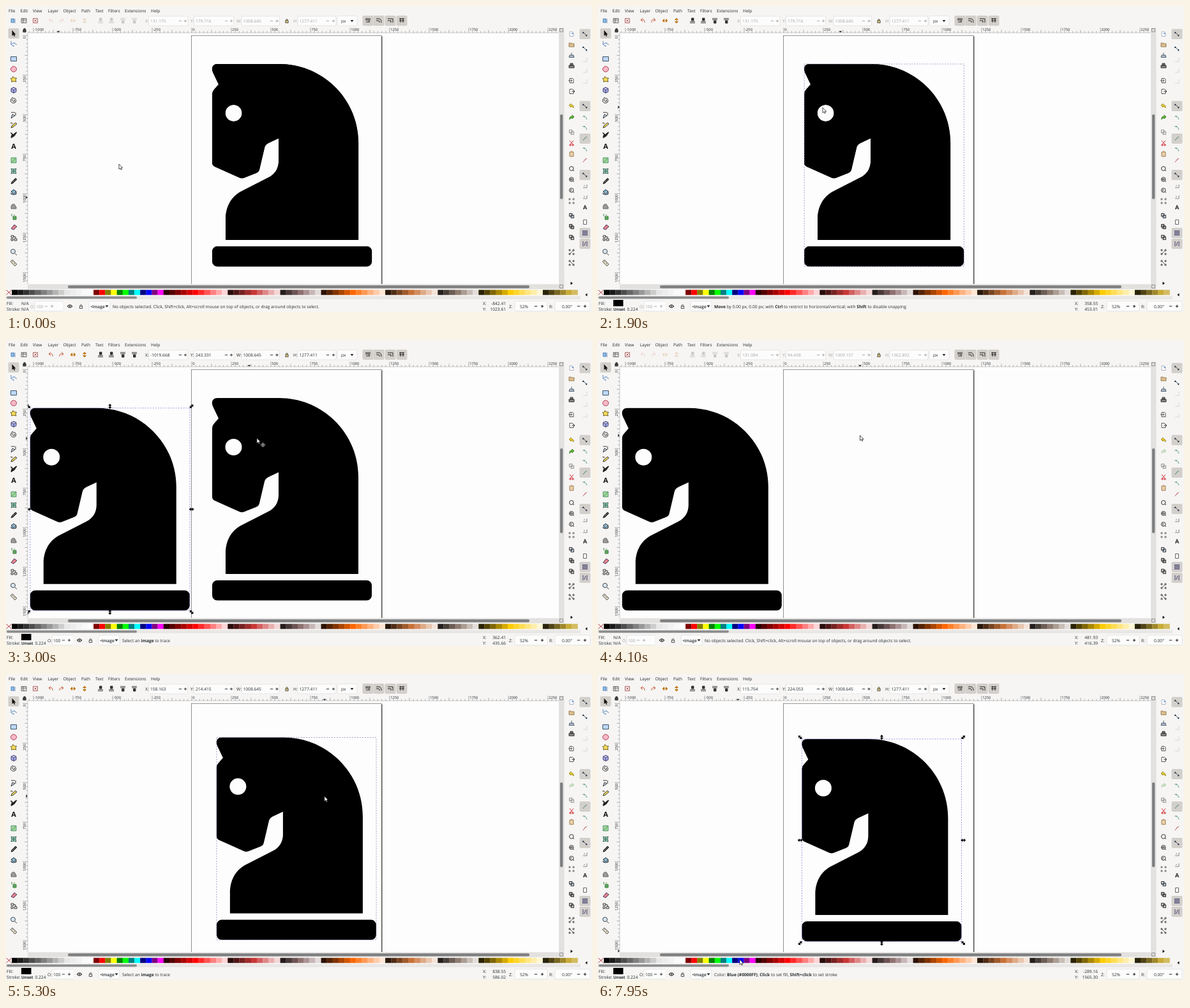
An HTML page for the animation above (8 s loop, 918x480 px).

```html
<!DOCTYPE html>
<html lang="en">
<head>
<meta charset="utf-8">
<title>Vector editor</title>
<style>
html, body { margin: 0; width: 100%; height: 100%; overflow: hidden; background: #f6f5f4; }
svg { display: block; font: 6.65px "Open Sans", "Noto Sans", sans-serif; text-rendering: geometricPrecision; fill: #26292b; }
text { white-space: pre; }
</style>
</head>
<body>
<svg id="stage" width="918" height="480" viewBox="0 0 918 480">
  <defs>
    <clipPath id="view"><rect x="34" y="42" width="832" height="394"/></clipPath>
    <path id="knight" fill="#000" fill-rule="evenodd" d="M8 0H105C173.500 0 229 55.500 229 124V276H21V244C21 222 31 207 47 199L88 178C98 173 104 164 104 152V116.500L88 124Q83 126.500 82 131L74 165Q73 169.500 69 171L50 178.500Q46.500 180 43 178.500L4 161Q0 159 0 155V47Q0 43 3 40L10 32L1 13C-2 6 1 0 8 0ZM20.500 77a13 13 0 1 0 26 0a13 13 0 1 0-26 0ZM8 286H242a8 8 0 0 1 8 8V309.500a8 8 0 0 1-8 8H8a8 8 0 0 1-8-8V294a8 8 0 0 1 8-8Z"/>
    <path id="handle" fill="#000" d="M-4 0L-1-2.700V-.9H1V-2.700L4 0L1 2.700V.9H-1V2.700Z"/>
  </defs>
</svg>
<script>
const LOOP = 8000, STEP = 50, LAG = 100, UNIT = 0.248, OX = 290.97, OY = 46.4;
const INK = '#26292b', PALE = '#a3a5a5', PANEL = '#f6f5f4';
const toX = x => OX + x * UNIT, toY = y => OY + y * UNIT;
const stage = document.getElementById('stage');

function add(parent, tag, attrs, content) {
  const node = document.createElementNS('http://www.w3.org/2000/svg', tag);
  set(node, attrs);
  if (content !== undefined) node.textContent = content;
  parent.append(node);
  return node;
}
function set(node, attrs) {
  for (const key in attrs) node.setAttribute(key, attrs[key]);
}
const group = (parent, attrs = {}) => add(parent, 'g', attrs);
const rect = (parent, x, y, width, height, fill, more) =>
  add(parent, 'rect', { x, y, width, height, fill, ...more });
const label = (parent, x, y, text, more) => add(parent, 'text', { x, y, ...more }, text);
const icon = (parent, x, y, d, fill = 'none', stroke = '#333') =>
  add(parent, 'path', { d, fill, stroke, 'stroke-width': 0.9, transform: `translate(${x} ${y})` });
const show = (node, on) => node.setAttribute('visibility', on ? 'visible' : 'hidden');
const move = (node, x, y) => node.setAttribute('transform', `translate(${x} ${y})`);
const box = (parent, x, y, w, h) =>
  rect(parent, x, y, w, h, '#fcfcfc', { stroke: '#e0ddda', 'stroke-width': 0.7, rx: 2 });
const pressed = (x, y) => rect(stage, x - 8.5, y - 8, 17, 16, '#d3cfcb', { rx: 2 });
const plusMinus = (parent, minus, plus, y) =>
  icon(parent, 0, y, `M${minus - 2.200} 0h4.400M${plus - 2.200} 0h4.400M${plus}-2.200v4.400`, 'none', 'currentColor');

// Canvas
rect(stage, 0, 0, 918, 480, PANEL);
rect(stage, 34, 42, 832, 394, '#fefdfe');
const canvas = group(stage, { 'clip-path': 'url(#view)' });
rect(canvas, 588, 47.5, 1.6, 400, '#55554f');
rect(canvas, 290.5, 46.3, 297.6, 420, '#fefdfe', { stroke: '#777', 'stroke-width': 0.8 });
const picture = add(canvas, 'use', { href: '#knight', x: 323, y: 91 });
const shape = add(canvas, 'use', { href: '#knight' });
const outline = rect(canvas, 0, 0, 250, 317, 'none', { 'stroke-width': 0.8, 'stroke-dasharray': '2 2' });
const handles = group(canvas);
for (const row of [-1, 0, 1]) for (const col of [-1, 0, 1]) {
  if (row || col) add(handles, 'use', { href: '#handle' }).spot = [col, row];
}

// Rulers
const ruler = group(stage, { 'font-size': 5.8 });
let ticksX = '', ticksY = '';
for (let n = -41; n <= 92; n++) {
  const long = n % 10 === 0 ? 8 : n % 5 === 0 ? 4.5 : 2.6;
  const x = toX(n * 25), y = toY(n * 25);
  if (x > 34 && x < 866) ticksX += `M${x} 42v${-long}`;
  if (y > 42 && y < 436) ticksY += `M34 ${y}h${-long}`;
  if (n % 10) continue;
  if (x > 34) label(ruler, x + 1.2, 39, n * 25);
  if (y > 42 && y < 430) label(ruler, 0, 0, n * 25, {
    'text-anchor': 'end', transform: `translate(31 ${y + 1.5}) rotate(-90)` });
}
add(ruler, 'path', { d: ticksX + ticksY, stroke: '#777', 'stroke-width': 0.6 });
add(ruler, 'path', { d: 'M34 42H866M34 42V436', stroke: '#aaa', 'stroke-width': 0.6 });
const markX = add(ruler, 'path', { d: 'M-2.500 0h5L0 2.500Z' });
const markY = add(ruler, 'path', { d: 'M0-2.500v5L2.500 0Z' });
const LOCK = 'M-2.200-.5H2.200V3H-2.200ZM-1.500-.5V-2Q0-4 1.500-2V-.5';
icon(stage, 29, 38, LOCK, '#444');

// Scrollbars
rect(stage, 866, 34, 8.5, 410, '#e3e1df');
rect(stage, 34, 436.5, 832, 7.5, '#e3e1df');
rect(stage, 868, 170, 4.4, 133, '#7d7f80', { rx: 2 });
rect(stage, 97, 438.3, 723, 4.4, '#7d7f80', { rx: 2 });
for (const y of [38, 440]) icon(stage, 870, y, 'M-2.500-2.500h5v5h-5Z', '#ddd', '#888');

// Menu
Object.entries({ File: 4, Edit: 22.500, View: 42, Layer: 65.500, Object: 89.500, Path: 118,
  Text: 140, Filters: 160, Extensions: 186, Help: 227 }).forEach(([name, x]) => label(stage, x, 9.5, name));

// Top toolbar
icon(stage, 11, 23, 'M-3-3H1.500V3H-3ZM3-3V4', '#8ab8e8', '#5a86b5');
icon(stage, 28, 23, 'M-4-3.500H4V3.500H-4ZM-4-1H4M-1-3.500V3.500', '#ddd', '#666');
icon(stage, 46, 23, 'M-3.500-3.500h7v7h-7ZM-2-2L2 2M2-2L-2 2', 'none', '#a55');
const transforms = group(stage);
icon(transforms, 70, 23, 'M3 3Q4-3-3-1M-3-1L0-4M-3-1L0 1.500', 'none', '#c4512d');
icon(transforms, 87, 23, 'M-3 3Q-4-3 3-1M3-1L0-4M3-1L0 1.500', 'none', '#c4512d');
icon(transforms, 105, 23, 'M-4 0H4M-4 0L-1.500-2.500V2.500ZM4 0L1.500-2.500V2.500Z', '#e6a33b', '#b87316');
icon(transforms, 123, 23, 'M0-4V4M0-4L-2.500-1.500H2.500ZM0 4L-2.500 1.500H2.500Z', '#e6a33b', '#b87316');
[148, 165, 183, 201].forEach((x, i) => {
  icon(transforms, x, 23, i < 2 ? 'M-4 3.500H4M-4 1.500H4' : 'M-4-3.500H4M-4-1.500H4');
  icon(transforms, x, 23, i < 2 ? 'M-1.500-4H2V0H-1.500Z' : 'M-1.500 0H2V4H-1.500Z', '#333');
});
const fields = group(stage);
const values = [['X:', 218, 226, 273, 281], ['Y:', 289, 297, 345, 353],
  ['W:', 361, 371.500, 416, 424.500], ['H:', 450, 459.500, 504, 513]].map(([name, x, at, minus, plus]) => {
  box(fields, at - 2.5, 16, plus + 4.5 - at + 2, 15);
  label(fields, x, 26, name);
  plusMinus(fields, minus, plus, 23.5);
  return label(fields, at, 26, '');
});
icon(stage, 440, 23.5, LOCK, '#d8c27a', '#555');
box(stage, 519, 15.5, 31, 15.5);
label(stage, 525, 26, 'px');
icon(stage, 542, 23.5, 'M-2.500-1.500H2.500L0 1.800Z', INK, 'none');
[567, 584, 602, 620].forEach((x, i) => {
  pressed(x, 23);
  icon(stage, x, 23, ['M-4-3H4M-4-1H4M-3 2H3M3 2L1 0', 'M-4-3H0Q4-3 4 3M-4 0H0Q1 0 1 3',
    'M-4-3H4V3M-4 0H1V3', 'M-4-3H4M-4 0H4M-2-4V3M2-4V3'][i], 'none', '#111');
});

// Toolbox
pressed(12, 43);
const BLUE = '#4a78b8', DARK = '#222';
[[43, 'M-2.500-5V4L-.5 2.300L1 5L2.300 4.300L1 1.800H3.500Z', '#111', 'none'],
 [59, 'M-4-4V2L-1-1H2M-3 3H0V5M1-1L5 2', 'none', BLUE],
 [83, 'M-4.500-3.500H4.500V3.500H-4.500Z', '#bcd7f8', '#345'],
 [99, 'M-4.500 0a4.500 4.300 0 1 0 9 0a4.500 4.300 0 1 0-9 0Z', '#f6b8c8', '#a34'],
 [115, 'M-1-4.500L1-2 4.500-2 3 1 4 4 0 3-3.500 4-3 1-5-1-2-2Z', '#f5dd5c', '#665510'],
 [132, 'M0-4.500L4-2.500V2.500L0 4.500L-4 2.500V-2.500ZM-4-2.500L0-.5L4-2.500M0-.5V4.500', '#aaaee8', '#336'],
 [148, 'M0 0Q2-1 1.500 1.500Q-1 3-2.500 0Q-2-4 2-3Q5 0 3 3Q-1 6-4.500 2Q-5-3-1-4.800', 'none', DARK],
 [171, 'M-4 5L-2-1L2 1ZM-4-4H2M3-4V1', '#c9d8ea', DARK],
 [187, 'M-4 4L-3 1L3-4L5-2L-1 3ZM-5-3Q-2-5-2-2', '#f0d860', DARK],
 [203, 'M-4 4Q-4-2-1-1Q3-5 5-5L1 1ZM-5-4Q-1-4-2 0', DARK, DARK],
 [242, 'M-4-4H4V4H-4ZM-4 4L4-4', '#9fd49a', '#4a9060'],
 [259, 'M-4-4Q0-2 4-4Q2 0 4 4Q0 2-4 4Q-2 0-4-4M-3 0H3M0-3V3', '#92d2b0', '#355'],
 [275, 'M-4 4L-3 1L1-3L3-1L-1 3ZM1-3L3-5L5-3L3-1', '#555', DARK],
 [292, 'M-4-1L0-4L4-1L0 2ZM-4 1V3Q0 5 4 3V-1', '#7fb0cc', DARK],
 [314, 'M-4 4V0Q-3-4 1-3Q4-1 2 1H4V4Z', '#9a9a9a', '#666'],
 [331, 'M-1-1H4V4H-1ZM-4-4H-2M-4-2H-2M0-3H2', '#63a862', '#373'],
 [347, 'M-4 2L1-4L5-1L0 4Z', '#e57f8c', '#335'],
 [364, 'M-4-4H0V-1H-4ZM1 1H5V4H1ZM-4 1H-1V4H-4ZM0-2H3V1', '#eee', DARK],
 [386, 'M-4.500-1a3.500 3.500 0 1 0 7 0a3.500 3.500 0 1 0-7 0ZM2 2L5 5', '#d8e8f7', '#333'],
 [403, 'M-5-2L-2-5L5 2L2 5ZM-2-2L0-4M1 1L3-1', '#d8d0bc', '#555']
].forEach(([y, d, fill, stroke]) => icon(stage, 12, y, d, fill, stroke));
label(stage, 12, 224, 'A', { 'text-anchor': 'middle', 'font-size': 11, 'font-weight': 700, fill: '#111' });

// Command bar
const PAGE = 'M-3-3.500H1.500L3-2V3.500H-3Z', LENS = 'M-3.500 0a3.300 3.300 0 1 0 6.600 0a3.300 3.300 0 1 0-6.600 0ZM2 2L4 4';
const COPY = 'M-3.500-3.500H1V1H-3.500ZM-1-1H3.500V3.500H-1Z', BITS = 'M-4-4h2v2h-2ZM2-4h2v2h-2ZM-4 2h2v2h-2ZM2 2h2v2h-2Z';
[[44, PAGE, '#fff', '#aab'], [61, 'M-4-3H-1L0-2H4V3H-4Z', '#d9bd8e', '#997a4d'],
 [77, 'M-3 0H3L4 3.500H-4ZM0-4V1', '#b6bfd0', '#456'], [94, 'M-4-1H4V3H-4ZM-2-4H2V-1H-2Z', '#888', DARK],
 [117, PAGE + 'M-5 0H1M-1-2L1 0L-1 2', '#fff', '#444'], [134, PAGE + 'M0 0H5M3-2L5 0L3 2', '#fff', '#444'],
 [157, 'M-4-1L-1-4V-2Q4-2 3 3Q2 0-1 .5V2Z', '#e8cf3b', '#a08a10'],
 [198, COPY, '#eee', '#888'], [215, 'M-3-4L2 2M3-4L-2 2M-3 2h2v2h-2ZM1 2h2v2h-2Z', 'none', '#d0202c'],
 [232, 'M-3-3H3V4H-3ZM-1-4H1', '#e5d2ae', '#a0703a'],
 [255, LENS, '#eee', DARK], [272, LENS + 'M-2-1H1V1H-2Z', '#eee', DARK], [289, LENS + 'M-1-2V2', '#eee', DARK],
 [306, BITS, 'none', '#666'], [329, COPY, '#c9d6e5', DARK], [346, COPY + 'M-2 3V2', '#aaa', DARK],
 [363, COPY + 'M2-3V-1', '#c9c9c9', DARK], [386, BITS + 'M-2 2L2-2', '#ddd', '#444'],
 [403, BITS + 'M-2-2L2 2', '#ddd', '#444'], [435, 'M-1.500-2.500V2.500L2 0Z', '#111', 'none']
].forEach(([y, d, fill, stroke]) => icon(stage, 886, y, d, fill, stroke));
icon(stage, 887.5, 43, 'M-1-1h2v2h-2Z', '#4a90d9', 'none');
const redo = icon(stage, 886, 175, 'M4-1L1-4V-2Q-4-2-3 3Q-2 0 1 .5V2Z', '#62b53c', '#3b7d20');

// Snap bar
for (const y of [44, 157, 208, 265, 356, 373]) pressed(907, y);
const SNAP = 'M-2.500-2.500L2.500 2.500M-3.500-3h1.500v1.500h-1.500ZM1.500 1.500h1.500v1.500h-1.500Z';
for (const y of [44, 67, 157, 265]) icon(stage, 907, y, SNAP, '#345', '#345');
for (const y of [84, 101, 118]) icon(stage, 907, y, 'M-3 3H3V-3', 'none', '#d3d3d3');
for (const y of [175, 191, 208, 225, 242])
  icon(stage, 907, y, y % 2 ? 'M-3.500-2Q1-3 3 3M-1-3v2' : 'M-3 3Q0-2 3-3M0-1h1', 'none', y === 242 ? '#b34040' : '#3e8a6d');
for (const y of [282, 299]) icon(stage, 907, y, 'M-3 3H3V-2M-2 0H0', 'none', '#777');
label(stage, 907, 318.5, 'A', { 'text-anchor': 'middle', 'font-size': 9, 'font-weight': 700 });
icon(stage, 907, 339, 'M-2.500-3.500H2.500V3.500H-2.500Z', '#fff', '#555');
icon(stage, 907, 356, 'M-4-3H4M-4 0H4M-4 3H4M-3-4V4M0-4V4M3-4V4', 'none', '#336');
icon(stage, 907, 373, 'M-3-4V4M3-4V4M-1 3L1-3', 'none', '#336');

// Palette
const greys = [0, 10, 20, 30, 40, 50, 60, 70, 80, 90, 92.5, 95, 97.5, 100].map(v => `hsl(0 0% ${v}%)`);
const basics = 'maroon red olive yellow green lime teal aqua navy blue purple fuchsia'.split(' ');
const ramps = [0, 24, 48].flatMap(hue => [[12, 100], [10, 57], [8, 12.5]].flatMap(([n, sat]) =>
  Array.from({ length: n - 1 }, (_, k) => `hsl(${hue} ${sat}% ${(k + 1) / n * 100}%)`)));
const SWATCH = 9.14;
rect(stage, 0, 445.3, SWATCH, 8, '#fff');
icon(stage, 4.5, 449.3, 'M-4-3.700L4 3.700M4-3.700L-4 3.700', 'none', '#a01010');
[...greys, ...basics, ...ramps].slice(0, 97).forEach((color, i) =>
  rect(stage, (i + 1) * SWATCH, 445.3, SWATCH + 0.1, 8, color));
icon(stage, 909, 453, 'M1.500-2.500V2.500L-1.500 0Z', '#111', 'none');
rect(stage, 0, 455, 900, 5, '#e9e7e5');
rect(stage, 1, 455.6, 204, 3.6, '#8b8d8e', { rx: 1.8 });

// Status bar
label(stage, 1, 468.5, 'Fill:');
label(stage, 1, 478, 'Stroke:');
const noPaint = group(stage);
label(noPaint, 24, 468.5, 'N/A');
label(noPaint, 24, 478, 'N/A');
const paint = group(stage);
rect(paint, 24, 461, 15.5, 10, '#000');
label(paint, 24, 478, 'Unset', { 'font-weight': 700, 'font-size': 6.3 });
label(paint, 45.5, 478, '0.224');
const opacity = group(stage);
box(opacity, 45, 463, 45, 15.5);
label(opacity, 38, 473.5, 'O:');
label(opacity, 47, 473.5, '100');
plusMinus(opacity, 63, 72, 471);
const layer = group(stage);
rect(layer, 90, 461, 80, 19, PANEL);
icon(layer, 100, 471, 'M-4 0Q0-4.500 4 0Q0 4.500-4 0ZM-1 0h2', '#bbb', '#111');
icon(layer, 117.5, 471.5, LOCK, '#eee', '#444');
box(layer, 130, 463, 33, 15.5);
label(layer, 132.5, 473.5, '•Image', { 'font-weight': 600 });
icon(layer, 158, 471, 'M-2.500-1.500H2.500L0 1.800Z', INK, 'none');
const status = label(stage, 167, 473.5, '');
label(stage, 747, 468.5, 'X:');
label(stage, 747, 478, 'Y:');
const seenX = label(stage, 783, 468.5, '', { 'text-anchor': 'end' });
const seenY = label(stage, 783, 478, '', { 'text-anchor': 'end' });
for (const [name, x, from, width, text, at, minus, plus] of
  [['Z:', 788, 797, 51, '52%', 805, 830, 840], ['R:', 851, 860, 55, '0.00°', 871, 897, 907]]) {
  box(stage, from, 463, width, 15.5);
  label(stage, x, 473.5, name);
  label(stage, at, 473.5, text);
  plusMinus(stage, minus, plus, 471);
}

// Pointer
const pointer = group(stage);
icon(pointer, 0, 0, 'M0 0V8L1.900 6.300L3.200 9L4.500 8.400L3.300 5.800H5.600Z', '#fff', '#222').setAttribute('stroke-width', 0.8);
const cross = icon(pointer, 9.5, 10.5, 'M-3.500 0L0-3.500L3.500 0L0 3.500ZM-2 0H2M0-2V2', '#333', '#aaa');

// Pointer path in document units: time, x, y
const path = [[-100, -842.41, 1023.61], [0, -459.6, 813], [500, 300, 480], [800, 358.55, 453.01],
  [1800, 358.55, 453.01], [1900, 246, 456], [2400, -792.293, 516.625], [2550, -792.293, 516.625],
  [2900, 362.41, 435.66], [3000, 411.4, 434], [3200, 481.93, 416.39], [4200, 481.93, 416.39],
  [4500, -339.281, 614.936], [4650, -339.281, 614.936], [5150, 838.55, 586.02], [5350, 838.55, 586.02],
  [5650, 796.141, 595.658], [5850, 796.141, 595.658], [6450, 682.41, 584.1], [6550, 665.4, 603],
  [7000, 665.4, 603], [7600, -289.16, 1565.3], [7700, -289, 1619], [7950, -278, 1619]];

function pointerAt(t) {
  const i = Math.max(1, path.findIndex(key => key[0] >= t));
  const [t0, x0, y0] = path[i - 1], [t1, x1, y1] = path[i];
  const f = (t - t0) / (t1 - t0);
  return [x0 + (x1 - x0) * f, y0 + (y1 - y0) * f];
}

// Drags: press, release, shape position at the press
const drags = [[1850, 2650, 131.175, 179.716], [4650, 5250, -1019.668, 243.331], [5350, 5950, 158.163, 214.415]];
const SELECT = 3250, DELETE = 3650;
const HINT = {
  none: 'No objects selected. Click, Shift+click, Alt+scroll mouse on top of objects, or drag around objects to select.',
  trace: 'Select an *image* to trace',
  image: '*Image* 1009 × 1363: embedded in layer *Image*. Click selection again to toggle scale/rotation handles.',
  color: 'Color: *Blue (#0000FF)*; *Click* to set fill, *Shift+click* to set stroke'
};
let shownHint;
function setHint(text) {
  if (text === shownHint) return;
  shownHint = text;
  status.replaceChildren();
  text.split('*').forEach((part, i) => add(status, 'tspan', i % 2 ? { 'font-weight': 700 } : {}, part));
}

function draw(t) {
  const [px, py] = pointerAt(t);
  const seen = t > 7700 ? [-289.16, 1565.3] : pointerAt(t - LAG);
  const last = drags.filter(d => t >= d[0]).pop();
  const dragging = !!last && t < last[1];
  let [x, y] = [131.175, 179.716], delta = [0, 0];
  if (last) {
    const from = pointerAt(last[0] - LAG), to = pointerAt(Math.min(t, last[1]) - LAG);
    delta = [to[0] - from[0], to[1] - from[1]];
    [x, y] = [last[2] + delta[0], last[3] + delta[1]];
  }
  const onPicture = t >= SELECT && t < DELETE;
  const selected = t >= 1850 && !(t >= DELETE && t < 4650);
  const ready = selected && t > 1900;
  const usePicture = t >= SELECT && t < 4650;
  const bounds = usePicture ? [131.084, 94.458, 1009.157, 1362.892] : [x, y, 1008.645, 1277.411];

  move(pointer, toX(px), toY(py));
  show(cross, t > 2850 && t < SELECT);
  move(markX, toX(seen[0]), 39.3);
  move(markY, 31.3, Math.min(434.6, toY(seen[1])));
  seenX.textContent = seen[0].toFixed(2);
  seenY.textContent = seen[1].toFixed(2);

  show(picture, t < DELETE);
  move(shape, toX(x) - 0.3, toY(y));
  const [left, top, w, h] = [toX(bounds[0]) - 0.3, toY(bounds[1]), bounds[2] * UNIT, bounds[3] * UNIT + 0.7];
  set(outline, { x: left, y: top, width: w, height: h, stroke: dragging || t < 5350 && t >= 5250 ? '#8587b5' : '#7c7ce0' });
  show(outline, selected);
  show(handles, selected && !dragging && !(t >= 5250 && t < 5350));
  for (const mark of handles.children) {
    const [col, row] = mark.spot;
    const angle = col && row ? col * row * 45 : row ? 90 : 0;
    set(mark, { transform: `translate(${left + w / 2 + col * (w / 2 + 2.7)} ${top + h / 2 + row * (h / 2 + 2.7)}) rotate(${angle})` });
  }

  const tint = ready ? INK : PALE;
  set(fields, { fill: tint, color: tint });
  set(opacity, { fill: tint, color: tint, transform: `translate(${selected ? 27 : 0} 0)` });
  values.forEach((node, i) => { node.textContent = bounds[i].toFixed(3); });
  set(transforms, { opacity: selected ? 1 : 0.22 });
  set(redo, { opacity: t >= DELETE ? 0.3 : 1 });
  show(noPaint, !selected);
  show(paint, selected);
  move(layer, selected ? 15 : 0, 0);
  set(status, { x: selected ? 182 : 167 });
  setHint(t >= 7700 ? HINT.color : !selected ? HINT.none : onPicture ? HINT.image : !dragging ? HINT.trace :
    `*Move* by ${delta[0].toFixed(2)} px, ${delta[1].toFixed(2)} px; with *Ctrl* to restrict to horizontal/vertical; with *Shift* to disable snapping`);
}

const start = performance.now();
function tick() {
  const t = (performance.now() - start) % LOOP;
  draw(Math.floor(t / STEP) * STEP);
  requestAnimationFrame(tick);
}
tick();
</script>
</body>
</html>
```
